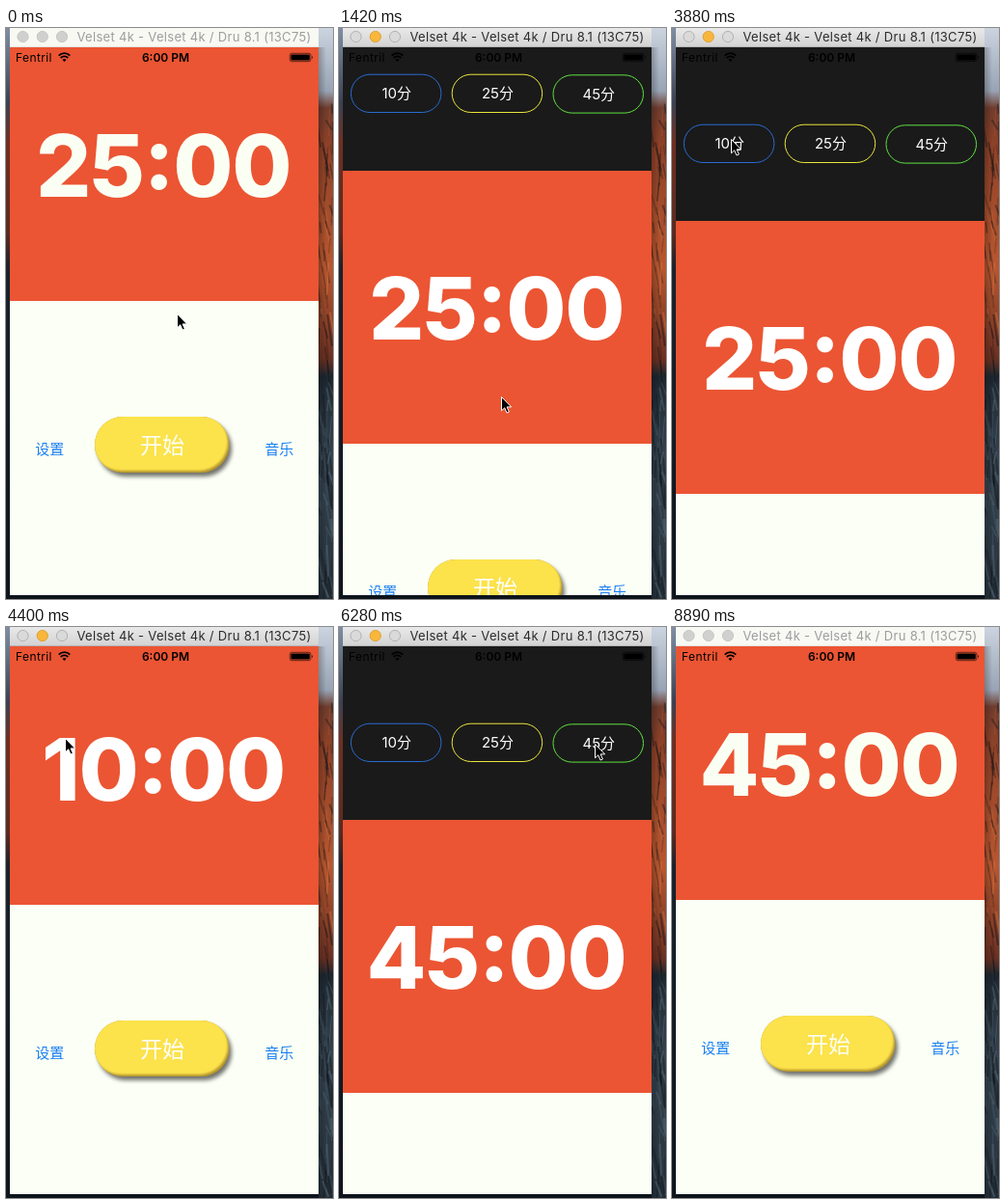
Recreate the animation shown at these times as an HTML page. Size 339 by 592 pixels, loop 8990 ms.

```html
<!DOCTYPE html>
<html lang="zh-CN">
<head>
<meta charset="utf-8">
<title>Pomodoro timer</title>
<style>
  html, body { margin: 0; width: 100%; height: 100%; overflow: hidden; background: #0d131a; }
  svg { display: block; width: 339px; height: 592px; }
  text { font-family: Inter, "Noto Sans CJK SC", "Noto Sans CJK", sans-serif; }
  .mid { text-anchor: middle; }
  .cjk { font-family: "Noto Sans CJK SC", "Noto Sans CJK", sans-serif; }
</style>
</head>
<body>
<svg viewBox="0 0 339 592" xmlns="http://www.w3.org/2000/svg">
  <defs>
    <linearGradient id="cliff" x2="0" y2="1">
      <stop offset="0" stop-color="#cbd4df"/>
      <stop offset=".11" stop-color="#98a4b5"/>
      <stop offset=".14" stop-color="#703c2d"/>
      <stop offset=".2" stop-color="#8c4128"/>
      <stop offset=".42" stop-color="#b9572f"/>
      <stop offset=".58" stop-color="#6a3022"/>
      <stop offset=".61" stop-color="#1d2730"/>
      <stop offset=".75" stop-color="#34434f"/>
      <stop offset="1" stop-color="#26323c"/>
    </linearGradient>
    <linearGradient id="edge" x2="0" y2="1">
      <stop offset="0" stop-color="#7f8ea4"/>
      <stop offset=".13" stop-color="#3b4152"/>
      <stop offset=".2" stop-color="#6e2f22"/>
      <stop offset=".36" stop-color="#5b2a20"/>
      <stop offset=".42" stop-color="#1a222c"/>
      <stop offset="1" stop-color="#0e151c"/>
    </linearGradient>
    <linearGradient id="shade">
      <stop offset="0" stop-color="#000" stop-opacity=".25"/>
      <stop offset="1" stop-color="#000" stop-opacity="0"/>
    </linearGradient>
    <linearGradient id="bar" x2="0" y2="1">
      <stop offset="0" stop-color="#e9e9e9"/>
      <stop offset="1" stop-color="#d2d2d2"/>
    </linearGradient>
    <filter id="soft" x="-20%" y="-40%" width="140%" height="180%"><feGaussianBlur stdDeviation="2.2"/></filter>
    <filter id="bevel" x="-20%" y="-40%" width="140%" height="180%"><feGaussianBlur stdDeviation="1.2"/></filter>
    <clipPath id="screen"><rect x="4" y="20" width="320" height="568"/></clipPath>
    <clipPath id="right"><rect x="324" width="15" height="592"/></clipPath>
    <clipPath id="pill"><rect x="92" y="403" width="139.5" height="58" rx="29"/></clipPath>
  </defs>

  <rect width="339" height="592" fill="#0d131a"/>
  <rect width="4" height="592" fill="url(#edge)"/>
  <g clip-path="url(#right)">
    <rect x="324" width="15" height="592" fill="url(#cliff)"/>
    <g id="rock"></g>
    <rect x="324" y="20" width="8" height="572" fill="url(#shade)"/>
  </g>

  <g clip-path="url(#screen)">
    <rect x="4" y="20" width="320" height="568" fill="#222"/>
    <g id="page">
      <rect x="4" y="-180" width="320" height="181" fill="#1a1a1a"/>
      <g id="choices"></g>
      <rect x="4" width="320" height="283" fill="#eb5533"/>
      <rect x="4" y="283" width="320" height="600" fill="#fbfff5"/>
      <text id="clock" class="mid" x="163" y="174.7" font-size="90" font-weight="800"
        letter-spacing="-1.3"><tspan id="minutes"></tspan><tspan dy="-8">:</tspan><tspan dy="8">00</tspan></text>
      <rect x="95" y="407" width="139" height="58" rx="29" opacity=".55" filter="url(#soft)"/>
      <g clip-path="url(#pill)">
        <rect x="92" y="403" width="140" height="58" fill="#b3942c"/>
        <rect x="89" y="399" width="141" height="60" rx="30" fill="#fce24c" filter="url(#bevel)"/>
      </g>
      <text id="start" class="mid cjk" x="162" y="440.5" font-size="23" font-weight="300">开始</text>
      <g font-size="15" fill="#1b80f5">
        <text class="cjk" x="30.3" y="441.7">设置</text>
        <text class="cjk" x="268.3" y="441.7">音乐</text>
      </g>
    </g>
    <g font-size="12">
      <text x="10" y="34.5" letter-spacing=".4">Fentril</text>
      <text class="mid" x="165.5" y="34.5" font-weight="600">6:00 PM</text>
      <g fill="none" stroke="#000" stroke-width="1.8">
        <path d="M54.7 28.6a8.2 8.2 0 0 1 11.6 0M56.7 31a5.4 5.4 0 0 1 7.6 0"/>
        <path d="M60.5 35l-2-2.1a2.8 2.8 0 0 1 4 0z" fill="#000" stroke="none"/>
      </g>
      <rect x="294.3" y="26.3" width="21.6" height="8.4" rx="2" fill="none" stroke="#000" stroke-width=".6"/>
      <rect x="295.4" y="27.4" width="19.4" height="6.2" rx="1"/>
      <path d="M317 28.8q1.6 1.7 0 3.4z"/>
    </g>
  </g>

  <rect id="title" x="4" width="320" height="20"/>
  <path id="line" d="M4 19.5H324" stroke="#b4b4b4"/>
  <g id="lights"></g>
  <text id="name" class="mid" x="195" y="14" font-size="13" letter-spacing=".3">Velset 4k - Velset 4k / Dru 8.1 (13C75)</text>

  <path id="cursor" d="M.5 .5V14.8L3.7 11.8L6 17L8.4 16L6.1 10.9H10.6Z" fill="#000" stroke="#fff" stroke-width="1"/>
</svg>
<script>
const LOOP = 8990;
const $ = id => document.getElementById(id);
const set = (el, attrs) => Object.entries(attrs).forEach(([k, v]) => el.setAttribute(k, v));

const linear = p => p;
const spring = p => (1 - Math.cos(Math.PI * p)) / 2;
const drag = p => p ** 1.36;

// Each move: start, end, easing, target values.
const pullMoves = [
  [860, 1600, drag, 215], [1870, 2140, spring, 200],
  [4180, 4425, spring, 0],
  [4870, 5050, drag, 279], [5280, 5595, spring, 200],
  [6280, 6525, spring, 0]
];
const pointerMoves = [
  [360, 600, linear, 173, 216], [860, 1600, drag, 166, 458],
  [1840, 2240, linear, 194, 278], [2650, 2710, linear, 195, 285],
  [2710, 3070, linear, 77, 339],
  [3360, 3600, linear, 146, 250], [3600, 3880, linear, 61, 115],
  [4400, 4750, linear, 165, 112], [4870, 5050, drag, 200, 432],
  [5240, 5400, linear, 203, 198], [5400, 6040, linear, 265, 121],
  [6500, 6780, linear, 238, 463], [6960, 7360, linear, 228, 596]
];

// Runs the moves one after another from the first values up to time t.
function follow(moves, from, t) {
  let now = from;
  for (const [start, end, ease, ...to] of moves) {
    if (t < start) break;
    const p = ease(Math.min(1, (t - start) / (end - start)));
    now = now.map((v, i) => v + (to[i] - v) * p);
  }
  return now.map(Math.round);
}

function buildChoices() {
  const colors = ['#2a6bd0', '#eae63c', '#5fe240'];
  $('choices').innerHTML = ['10分', '25分', '45分'].map((label, i) => {
    const x = 12.4 + i * 104.8, y = i === 2 ? 0.6 : 0;
    return `<rect x="${x}" y="${y - 99.8}" width="93.5" height="39.3" rx="19.6" fill="none" stroke="${colors[i]}"/>
      <text class="mid" x="${x + 47.3}" y="${y - 74.9}" font-size="15" fill="#fff">${label}</text>`;
  }).join('');
}

function buildRock() {
  let seed = 7, out = '';
  const rand = () => (seed = seed * 16807 % 2147483647) / 2147483647;
  for (let i = 0; i < 110; i++) {
    const x = 322 + rand() * 17, y = 78 + rand() * 510;
    const light = y < 350 ? '#dd7b45' : '#667987';
    const color = rand() < 0.6 ? '#0c1015' : light;
    out += `<path d="M${x} ${y}l${rand() * 10 - 3} ${10 + rand() * 28}" stroke="${color}"
      stroke-width="${0.6 + rand() * 1.6}" opacity="${0.15 + rand() * 0.3}"/>`;
  }
  $('rock').innerHTML = out;
}

function buildLights() {
  $('lights').innerHTML = [0, 1, 2].map(i => `<circle cx="${17.5 + i * 20.25}" cy="9" r="5.6"/>`).join('');
}

function paintWindow(active) {
  set($('title'), { fill: active ? 'url(#bar)' : '#f8f9f3' });
  set($('line'), { opacity: active ? 1 : 0.3 });
  set($('name'), { fill: active ? '#2c2c2c' : '#9d9d9d' });
  set($('lights'), { fill: active ? '#dadada' : '#d0d0ce', stroke: active ? '#b2b2b2' : '#c6c6c4' });
  set($('lights').children[1], active ? { fill: '#f8b73a', stroke: '#dfa033' } : { fill: 'inherit', stroke: 'inherit' });
  const ink = active ? '#fff' : '#fbfff3';
  set($('clock'), { fill: ink });
  set($('start'), { fill: ink });
}

function draw(t) {
  const [pull] = follow(pullMoves, [0], t);
  const [x, y] = follow(pointerMoves, [177, 296], t);
  paintWindow(t >= 890 && t < 8890);
  $('minutes').textContent = t < 4180 ? 25 : t < 6280 ? 10 : 45;
  set($('page'), { transform: `translate(0 ${pull})` });
  set($('cursor'), { transform: `translate(${x} ${y})` });
}

buildChoices();
buildRock();
buildLights();
const begin = performance.now();
function tick() {
  draw((performance.now() - begin) % LOOP);
  requestAnimationFrame(tick);
}
tick();
</script>
</body>
</html>
```
